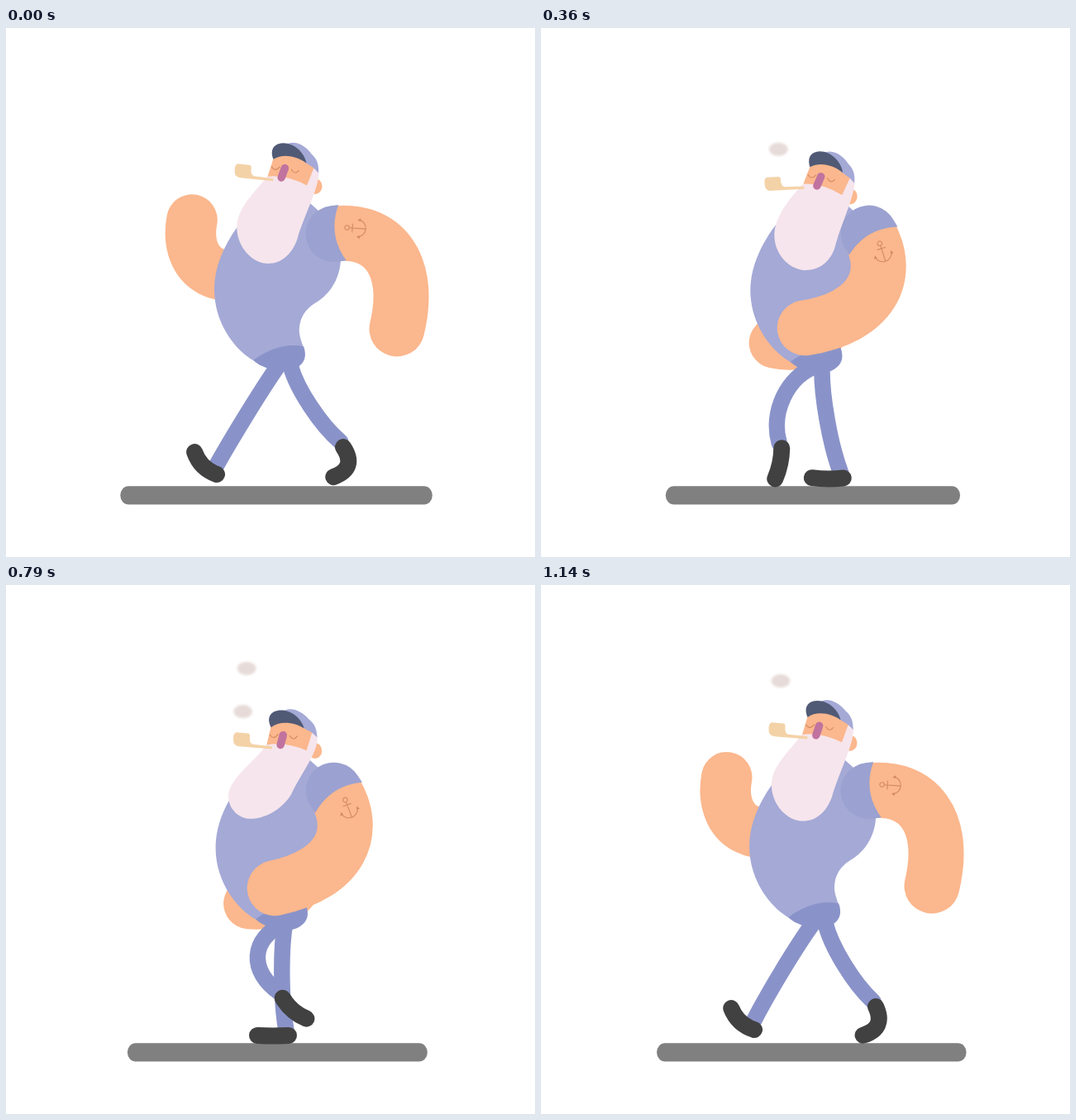
An HTML page that plays this animation: 640x640 px, repeating every 1.21 s.

```html
<!DOCTYPE html>
<html lang="en">
<head>
<meta charset="utf-8">
<title>Walking sailor</title>
<style>
  html, body { margin: 0; width: 100%; height: 100%; overflow: hidden; background: #fff; }
  svg { display: block; width: 100vw; height: 100vh; }
  .skin { fill: #fbb78d; }
  .limb { fill: none; stroke: #fbb78d; stroke-linecap: round; }
  .leg { fill: none; stroke: #8a93c9; stroke-width: 19.5; stroke-linecap: round; }
  .shoe { fill: none; stroke: #414141; stroke-width: 20; stroke-linecap: round; }
  .line { fill: none; stroke: #d38a63; stroke-width: 1.1; stroke-linecap: round; }
  .dot { fill: #d38a63; }
  .shirt { fill: #a4a9d6; }
  .puff { fill: #e6dbd8; filter: url(#soft); }
</style>
</head>
<body>
<svg viewBox="0 0 640 640">
  <defs>
    <filter id="soft" x="-50%" y="-50%" width="200%" height="200%">
      <feGaussianBlur stdDeviation="1.4"/>
    </filter>
  </defs>
  <rect id="ground" y="554.2" height="22.3" rx="10" ry="11" fill="#808080"/>
  <path id="farArm" class="limb" stroke-width="61.5" d="M330 277C262 325 214 290 225 232"/>
  <path id="legA" class="leg"/>
  <path id="legB" class="leg"/>
  <path id="torso" class="shirt"/>
  <path id="pelvis" fill="#8a93c9" d="M299 402C318 388 338 381 360 385C364 396 362 405 352 411C340 419 312 414 299 402Z"/>
  <path id="shoeA" class="shoe"/>
  <path id="shoeB" class="shoe"/>
  <g id="nearArm">
    <path class="limb" stroke-width="67" d="M397 249C455 242 492 285 473 364"/>
    <g transform="translate(397 249) rotate(-8)">
      <path fill="#9ba1d0" d="M10 -34L0 -34A34.5 34 0 0 0 0 34L10 34Q-8 0 10 -34Z"/>
      <g transform="translate(16.5 -5.2) rotate(12)">
        <path class="line" d="M2.8 0H22.5M6.5 -5V5M14 -10.5A10.7 10.7 0 0 1 14 10.5"/>
        <circle class="line" r="2.8"/>
        <path class="dot" d="M12 -10L16 -12.5L16 -8.5ZM12 10L16 12.5L16 8.5Z"/>
      </g>
    </g>
  </g>
  <g id="head">
    <ellipse class="skin" cx="374" cy="191" rx="8.5" ry="9.5"/>
    <path class="skin" d="M324 155C340 146 362 154 374 170L366 194L315 184Z"/>
    <path class="shirt" d="M340 140C352 135 364 145 369 152C377 159 378 166 378 176L371 168L361 162Z"/>
    <path fill="#515a75" d="M323 159C320 152 320 144 328 140.5C343 135 360 148 363 163C352 155 335 151 323 159Z"/>
    <path class="line" d="M321 168Q325 175 331 168M345 171Q349 178 354 172"/>
  </g>
  <path id="beard" fill="#f6e5ec"/>
  <path id="pipe" fill="#f4d2a7" d="M-43 -19.5L-29 -18Q-26 -18 -26.5 -14Q-27.5 -6 -23 -4.7L0 -1.8V1.5L-39 -2.5Q-46.5 -3 -46.5 -10Q-47 -18 -43 -19.5Z"/>
  <path id="nose" d="M337 169.5L333 181" stroke="#c1739f" stroke-width="9.5" stroke-linecap="round"/>
  <ellipse id="puffA" class="puff"/>
  <ellipse id="puffB" class="puff"/>
</svg>
<script>
const LOOP = 1210, STEPS = 17, HALF = STEPS / 2;

// One stride of a foot: step, heel x, heel y, toe drop in degrees, sole curve, knee bend.
const stride = [
  [0, 255, 540, -45, 9, 2],     // heel strikes
  [.5, 298, 545, 0, 1, 14],     // flat
  [2.5, 342, 545, 0, 1, 6],
  [4.5, 385, 541, 5, 5, 9],
  [7.5, 405, 510, 66, 22, 9],   // pushes off
  [8.5, 408, 507, 72, 24, 9],
  [9, 389, 512, 114, 10, 18],   // swings forward
  [11.25, 329, 499, 138, -7, 41],
  [13.25, 295, 506, 88, 3, 28],
  [16, 258, 538, -43, 9, 3]
];
const pipeTilt = [[0, 0], [3, 2], [5, -9], [9, 9], [11, -1], [13, -4]];

// Looping cubic interpolation between the rows of a track.
function sample(rows, step) {
  const row = i => {
    const turn = Math.floor(i / rows.length);
    const [t, ...v] = rows[i - turn * rows.length];
    return { t: t + turn * STEPS, v };
  };
  let i = 0;
  while (row(i + 1).t <= step) i++;
  const [a, b, c, d] = [i - 1, i, i + 1, i + 2].map(row);
  const span = c.t - b.t, u = (step - b.t) / span, w = 1 - u;
  return b.v.map((p, k) => {
    const q = c.v[k];
    const inn = (q - a.v[k]) / (c.t - a.t) * span;
    const out = (d.v[k] - p) / (d.t - b.t) * span;
    return (1 + 2 * u) * w * w * p + u * w * w * inn + u * u * (3 - 2 * u) * q - u * u * w * out;
  });
}

const el = id => document.getElementById(id);
const set = (id, attrs) => Object.entries(attrs).forEach(([k, v]) => el(id).setAttribute(k, v));
const rad = degrees => degrees * Math.PI / 180;

function ease(x) {
  const u = Math.min(1, Math.max(0, x));
  return u * u * u * (10 - 15 * u + 6 * u * u);
}

// 0 to 1 and back; each way takes the given share of half a loop.
const swing = (step, there, back) => step < HALF
  ? ease(step / HALF / there)
  : 1 - ease((step - HALF) / HALF / back);

function drawLeg(side, step) {
  const [x, y, drop, sole, bend] = sample(stride, step);
  const hipX = 337 + (x - 335) * .1, hipY = 409;
  const dx = x - 3 - hipX, dy = y - 6 - hipY, length = Math.hypot(dx, dy);
  const knee = f => `${hipX + dx * f - dy / length * bend} ${hipY + dy * f + dx / length * bend}`;
  set('leg' + side, { d: `M${hipX} ${hipY}C${knee(.25)} ${knee(.72)} ${hipX + dx} ${hipY + dy}` });
  set('shoe' + side, { d: `M0 0Q-19 ${sole} -38 0`, transform: `translate(${x} ${y}) rotate(${-drop})` });
}

function drawBody(bob) {
  const lean = bob * .13, px = bob * .25, py = bob * .2;
  const c = (a, b) => `${a + lean} ${b + lean} `;
  const r = (a, b) => `${a + px} ${b + py * 2} `;
  set('torso', { d: `M${c(335, 190)}C${c(300, 210)}${c(252, 262)}${c(252, 316)}` +
    `C${c(252, 358)}${c(278, 390)}${299 + px} ${402 + py}L${361 + px} ${390 + py}` +
    `C${r(356, 375)}${r(354, 370)}${r(355, 362)}C${r(357, 342)}${r(372, 334)}${r(377, 331)}` +
    `C${r(398, 317)}${r(405, 295)}${r(405, 278)}C${c(405, 250)}${c(395, 232)}${c(378, 221)}` +
    `C${c(368, 212)}${c(355, 200)}${c(335, 190)}Z` });
  set('pelvis', { transform: `translate(${px} ${py})` });
}

function drawHead(step, bob, sway) {
  const x = sway * 1.5, y = bob, tilt = sway * 4.5;
  const transform = `translate(${x} ${y}) rotate(${tilt} 335 175)`;
  set('head', { transform });
  set('nose', { transform });

  const cos = Math.cos(rad(tilt)), sin = Math.sin(rad(tilt));
  const at = (a, b) => [335 + x + (a - 335) * cos - (b - 175) * sin,
                        175 + y + (a - 335) * sin + (b - 175) * cos];

  // The tip of the beard is blown forward during the second half.
  const blown = ease((step - 5.5) / 3) * (1 - ease((step - 11.5) / 4.5));
  const trail = x + bob * .2;
  const lx = 279 + trail - 11 * blown, ly = 241 + y + 3 * blown;
  const bx = 317 + trail - 23 * blown, by = 285 + y * .8 - 12 * blown;
  const rx = 352 + trail - 8 * blown, ry = 256 + y - 15 * blown;
  const [ex, ey] = at(375, 195);
  const dx = (rx - ex) * .3, dy = (ry - ey) * .3;
  set('beard', { d: `M${at(316, 180)}C${at(300, 200)} ${lx} ${ly - 22} ${lx} ${ly}` +
    `C${lx} ${ly + (by - ly) * .55} ${bx - (bx - lx) * .5} ${by} ${bx} ${by}` +
    `C${bx + (rx - bx) * .45} ${by} ${rx + dx} ${ry + dy} ${rx} ${ry}` +
    `C${rx - dx} ${ry - dy * 1.4} ${at(379, 192)} ${at(378, 175)}` +
    `L${at(372, 169)}L${at(364, 190)}Q${at(338, 177)} ${at(316, 180)}Z` });

  const [angle] = sample(pipeTilt, step);
  const [mx, my] = at(323, 184);
  set('pipe', { transform: `translate(${mx - Math.abs(angle) * .6} ${my}) rotate(${angle})` });
}

function drawPuff(id, age) {
  const size = age > 0 ? Math.max(0, Math.min(1, (13 - age) * .7)) : 0;
  set(id, {
    cx: 284.7 + age * .65,
    cy: 174 - age * 6.5 - age * age * .08,
    rx: size * Math.min(11.3, Math.max(0, 6 + age * 2)),
    ry: size * Math.min(8, Math.max(0, 6 + age))
  });
}

function draw(step) {
  const half = step % HALF / HALF;
  const sway = Math.sin(2 * Math.PI * (step + .5) / STEPS);
  const bob = (15 + 3 * sway) * Math.sin(Math.PI * half ** .6) ** 2;

  const inset = 13.5 * Math.sin(Math.PI * half) ** 2;
  set('ground', { x: 138.3 + inset, width: 377.5 - inset * 1.7 });

  set('nearArm', { transform: `rotate(${88 * swing(step, .9, .8)} 397 249)` });
  set('farArm', { transform: `rotate(${-115 * swing(step, .9, .95)} 330 277)` });

  // The leading foot lingers on the ground in the first half.
  const linger = step < 8 ? step * step * (8 - step) * .02 : 0;
  drawLeg('A', step - linger);
  drawLeg('B', (step + HALF) % STEPS);

  drawBody(bob);
  drawHead(step, bob, sway);
  drawPuff('puffA', step - 1);
  drawPuff('puffB', step - 7.9);
}

// Steps last 70 ms, apart from two that last 80 ms.
const stepStart = i => 70 * i + (i > 3 ? 10 : 0) + (i > 10 ? 10 : 0);

function tick(now) {
  const time = now % LOOP;
  let step = STEPS - 1;
  while (stepStart(step) > time) step--;
  draw(step);
  requestAnimationFrame(tick);
}
draw(0);
requestAnimationFrame(tick);
</script>
</body>
</html>
```
